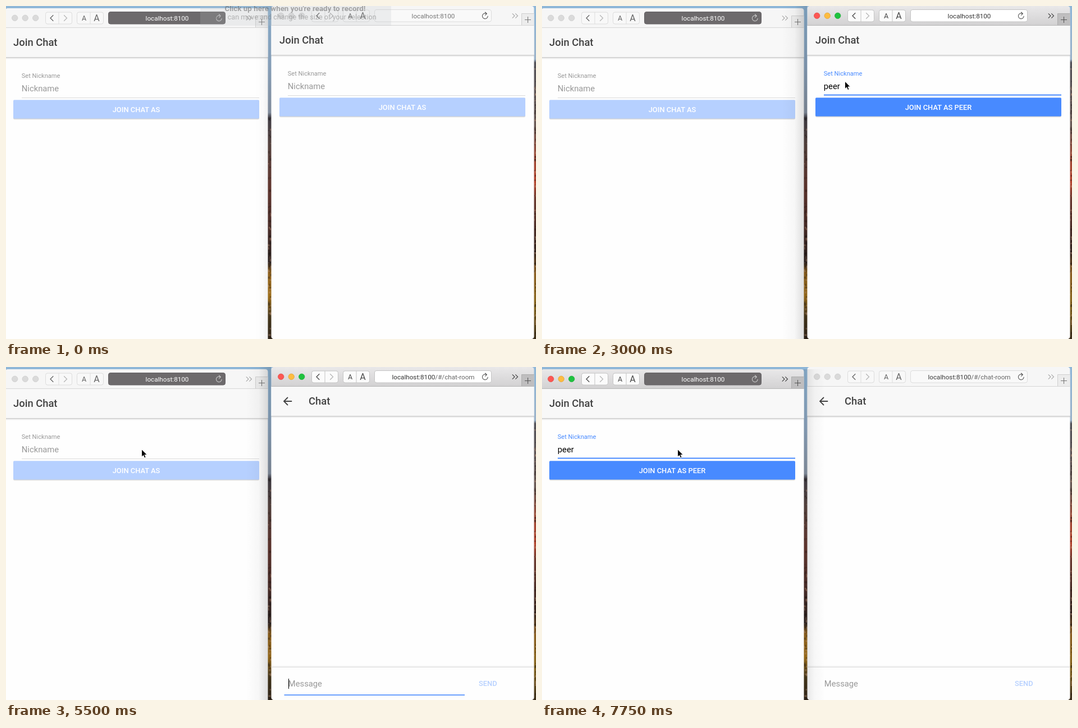
An HTML page for the animation above (8 s loop, 944 by 593 pixels).

```html
<!DOCTYPE html>
<html lang="en">
<head>
<meta charset="utf-8">
<title>Join Chat</title>
<style>
  html, body { margin: 0; width: 100%; height: 100%; overflow: hidden; }
  svg { display: block; width: 100vw; height: 100vh; }
  text { font-family: Roboto, sans-serif; white-space: pre; }
  .title { font-size: 18.4px; font-weight: 500; fill: #424242; }
  .button { font-size: 12.9px; font-weight: 500; }
  .field { font-size: 14.77px; }
  .label { font-size: 11.08px; }
  .url { font-size: 11.7px; }
  .mid { text-anchor: middle; }
  .line { fill: none; }
</style>
</head>
<body>
<svg viewBox="0 0 944 593">
  <defs>
    <linearGradient id="hillsA" x2="0" y2="1">
      <stop offset="0" stop-color="#8fb7d8"/><stop offset=".18" stop-color="#8fa9c4"/>
      <stop offset=".32" stop-color="#8a96a6"/><stop offset=".335" stop-color="#45424a"/>
      <stop offset=".42" stop-color="#5b4742"/><stop offset=".54" stop-color="#683a32"/>
      <stop offset=".66" stop-color="#50302b"/><stop offset=".77" stop-color="#2c2220"/>
      <stop offset=".8" stop-color="#96661f"/><stop offset=".87" stop-color="#a8761c"/>
      <stop offset=".93" stop-color="#4b3b1c"/><stop offset="1" stop-color="#34281c"/>
    </linearGradient>
    <linearGradient id="hillsB" x2="0" y2="1">
      <stop offset="0" stop-color="#8fb7d8"/><stop offset=".16" stop-color="#9db4ca"/>
      <stop offset=".17" stop-color="#55545a"/><stop offset=".36" stop-color="#6b5b56"/>
      <stop offset=".46" stop-color="#a04a36"/><stop offset=".53" stop-color="#b4452f"/>
      <stop offset=".58" stop-color="#6a3a30"/><stop offset=".74" stop-color="#33241f"/>
      <stop offset=".8" stop-color="#8a5f22"/><stop offset=".9" stop-color="#8a6a20"/>
      <stop offset="1" stop-color="#3a2e1c"/>
    </linearGradient>
    <linearGradient id="bar" x2="0" y2="1">
      <stop offset="0" stop-color="#e9e8e9"/><stop offset="1" stop-color="#d2d1d2"/>
    </linearGradient>
    <linearGradient id="drop" x2="0" y2="1">
      <stop offset="0" stop-opacity=".26"/><stop offset=".3" stop-opacity=".12"/><stop offset="1" stop-opacity="0"/>
    </linearGradient>
    <linearGradient id="shadeRight">
      <stop offset="0" stop-opacity="0"/><stop offset=".5" stop-opacity=".03"/><stop offset="1" stop-opacity=".16"/>
    </linearGradient>
    <linearGradient id="shadeLeft">
      <stop offset="0" stop-opacity=".12"/><stop offset=".5" stop-opacity=".03"/><stop offset="1" stop-opacity="0"/>
    </linearGradient>
    <clipPath id="frame"><rect x="-1.5" y="4" width="468" height="593" rx="4.5"/></clipPath>
  </defs>
  <g id="desktop"></g>
  <g id="scene"></g>
</svg>
<script>
const LOOP = 8000, STEP = 250;
const BLUE = '#488aff', PALE = '#b6d0ff';

const rect = (x, y, w, h, fill, extra = '') =>
  `<rect x="${x}" y="${y}" width="${w}" height="${h}" fill="${fill}" ${extra}/>`;
const text = (x, y, cls, fill, str, extra = '') =>
  `<text x="${x}" y="${y}" class="${cls}" fill="${fill}" ${extra}>${str}</text>`;
const stroke = (d, color, width = 1.3) =>
  `<path class="line" d="${d}" stroke="${color}" stroke-width="${width}"/>`;

// Latest entry whose time has come: [time, ...values]
const latest = (t, list) => list.filter(entry => entry[0] <= t).pop();
const blinkOn = (t, since) => Math.floor((t - since) / 500) % 2 === 0;

const ruler = document.createElement('canvas').getContext('2d');
function textWidth(str) {
  ruler.font = '14.77px Roboto, sans-serif';
  return ruler.measureText(str).width;
}

const LEFT_KEYS = [[5750, ''], [6750, 'pe'], [7250, 'peer']];
const RIGHT_KEYS = [[1250, ''], [2000, 'p'], [2250, 'pe'], [2500, 'peer'], [3500, 'peer7']];
const POINTER = [[250, 536, 110], [500, 538, 124], [750, 539, 133.5],
  [5000, 300, 131.5], [5250, 245, 143], [5500, 241, 146]];

function toolbar({ active, dark, path }) {
  const ink = active ? '#4a4a4a' : '#666';
  const edge = active ? '#c4c4c4' : '#dcdcdc';
  const face = active ? '#fbfbfb' : '#f8f8f8';
  const lights = active ? ['#fc5753', '#fdbc40', '#1fc23f'] : ['#dadada', '#dadada', '#dadada'];
  const rims = active ? ['#df4744', '#de9f34', '#18a832'] : ['#cbcbcb', '#cbcbcb', '#cbcbcb'];
  const pair = (x, w) => rect(x, 11, w, 21, face, `stroke="${edge}" rx="3.5"`) +
    stroke(`M${x + w / 2} 11v21`, edge, 1);
  const urlInk = dark ? '#fff' : active ? '#333' : path ? '#3c3c3c' : '#777';
  const reloadInk = dark ? '#c8c8c8' : '#555';
  return rect(-2, 4, 469, 35, active ? 'url(#bar)' : '#f6f6f6') +
    lights.map((c, i) =>
      `<circle cx="${15.7 + 18.5 * i}" cy="21.3" r="5.2" fill="${c}" stroke="${rims[i]}" stroke-width=".7"/>`).join('') +
    pair(70.5, 47) + pair(126.5, 47) +
    stroke('M84.3 16.2l-5.3 5.3 5.3 5.3', ink) +
    stroke('M103.2 16.2l5.3 5.3-5.3 5.3', '#b5b5b5') +
    text(139, 26, 'mid', ink, 'A', 'font-size="12.5"') +
    text(161.5, 27, 'mid', ink, 'A', 'font-size="16"') +
    rect(182.5, 10.5, 208, 21.5, dark ? '#6d6a6c' : active ? '#fff' : '#f9f9f9',
      `rx="3.5" stroke="${dark ? '#646164' : edge}"`) +
    text(287, 25.8, 'url mid', urlInk,
      'localhost:8100' + (path ? `<tspan fill="#666">${path}</tspan>` : '')) +
    stroke('M381.8 17.6A4.9 4.9 0 1 0 384.2 21.8M379.2 14.6l3.2 3.1-3.2 3', reloadInk, 1.1) +
    stroke('M427.8 17.3l4.2 4.2-4.2 4.2M433.3 17.3l4.2 4.2-4.2 4.2', active ? '#444' : '#aaa', 1.2) +
    rect(444, 17, 23, 22, active ? '#bfbebf' : '#ececec') +
    stroke('M444.5 39V17.5H467', active ? '#adadad' : '#cfcfcf', 1) +
    stroke('M450 28.5h11M455.5 23v11', active ? '#555' : '#777', 1.1) +
    stroke('M-2 38.5H467', active ? '#b5b5b5' : '#d6d6d6', 1);
}

const header = () => rect(-2, 39, 469, 52, '#f8f8f8') + rect(-2, 91, 469, 4, 'url(#drop)');

function joinPage(t, keys) {
  const key = latest(t, keys);
  const name = key ? key[1] : '';
  const fill = name ? BLUE : PALE;
  return rect(-2, 39, 469, 560, '#fefefe') + header() +
    text(13, 71.3, 'title', '#424242', 'Join Chat') +
    text(27.8, 127.8, 'label', key ? BLUE : '#999', 'Set Nickname') +
    text(27.8, 151.6, 'field', name ? '#000' : '#999', name || 'Nickname') +
    (key && blinkOn(t, key[0]) ? rect(28 + Math.round(textWidth(name)), 138, 1, 17.5, '#000') : '') +
    (key ? rect(28, 161.5, 423, 2, BLUE) : rect(28, 163, 423, 1, '#dadada')) +
    rect(13, 169, 438, 33.5, '#000', 'rx="2" opacity=".06"') +
    rect(13, 168, 438, 33.5, '#000', 'rx="2" opacity=".13"') +
    rect(13, 167.3, 438, 33.2, fill, 'rx="1.8"') +
    text(232, 188.7, 'button mid', '#fff', ('Join chat as ' + name).trim().toUpperCase());
}

function chatPage(t) {
  const focused = t >= 5250 && t < 5750;
  return rect(-2, 39, 469, 560, '#fefefe') + header() +
    stroke('M35.2 65H21.2M28 58l-7 7 7 7', '#424242', 1.8) +
    text(65, 71.3, 'title', '#424242', 'Chat') +
    rect(-2, 536, 469, 2, '#000', 'opacity=".04"') +
    rect(-2, 538, 469, 1, '#dcdcdc') +
    text(28.8, 573.2, 'field', '#999', 'Message') +
    text(368, 572.2, 'button', PALE, 'SEND') +
    (focused ? rect(21.5, 587.3, 321.5, 1.6, BLUE) + rect(29, 559, 1, 18, '#000') : '');
}

const browser = (dx, dy, options, page) =>
  `<g transform="translate(${dx} ${dy})"><g clip-path="url(#frame)">${toolbar(options)}${page}</g></g>`;

function pointer(t) {
  const spot = latest(t, POINTER);
  return spot ? `<path transform="translate(${spot[1]} ${spot[2]})" fill="#000" stroke="#fff" stroke-width="1"
    d="M.5 .5V14.2L3.6 11.3 5.7 16.1 8.1 15.1 6 10.4H10.3Z"/>` : '';
}

function recorderHint() {
  return rect(346, 0, 340, 35, '#b8bcc0', 'opacity=".2"') +
    text(515, 8.5, 'mid', '#666', 'Click up here when you\'re ready to record!',
      'font-size="13.4" font-weight="700" opacity=".55"') +
    text(515, 24.3, 'mid', '#777', 'You can move and change the size of your selection',
      'font-size="12.6" opacity=".5"');
}

function scene(t) {
  const leftActive = t >= 5750, rightActive = t >= 1000 && !leftActive;
  let rightPage = t < 4750 ? joinPage(t, RIGHT_KEYS) : chatPage(t);
  if (t >= 4500 && t < 4750)
    rightPage += `<g transform="translate(0 3)" opacity=".93">${chatPage(t)}</g>`;

  const shade = leftActive ? rect(466, 4, 38, 589, 'url(#shadeLeft)')
    : rect(rightActive ? 428 : 444, 0, rightActive ? 44 : 28, 593, 'url(#shadeRight)',
      `opacity="${rightActive ? 1 : .5}"`);
  const left = browser(0, 0, { active: leftActive, dark: true }, joinPage(t, LEFT_KEYS));
  const right = browser(474, -4,
    { active: rightActive, path: t >= 4750 ? '/#/chat-room' : '' }, rightPage);

  return (leftActive ? right + shade + left : left + shade + right) +
    (t < 250 ? recorderHint() : '') + pointer(t);
}

function desktop() {
  let seed = 7;
  const random = () => (seed = seed * 16807 % 2147483647) / 2147483647;
  let out = rect(0, 0, 944, 6, '#8fb7d8') + rect(464, 0, 12, 593, 'url(#hillsA)') +
    rect(936, 0, 8, 593, 'url(#hillsB)');
  for (let i = 0; i < 170; i++) {
    const onLeft = i % 2;
    const top = onLeft ? 198 : 105;
    out += rect(onLeft ? 466 + random() * 5 : 940 + random() * 3, top + random() * (590 - top),
      1 + random() * 3, 1 + random() * 4, random() < .6 ? '#1c1413' : '#d0a080', 'opacity=".35"');
  }
  return out;
}

document.getElementById('desktop').innerHTML = desktop();
const stage = document.getElementById('scene');
let shown = -1;
function draw() {
  const step = Math.floor(performance.now() % LOOP / STEP);
  if (step !== shown) stage.innerHTML = scene(step * STEP);
  shown = step;
  requestAnimationFrame(draw);
}
draw();
</script>
</body>
</html>
```
